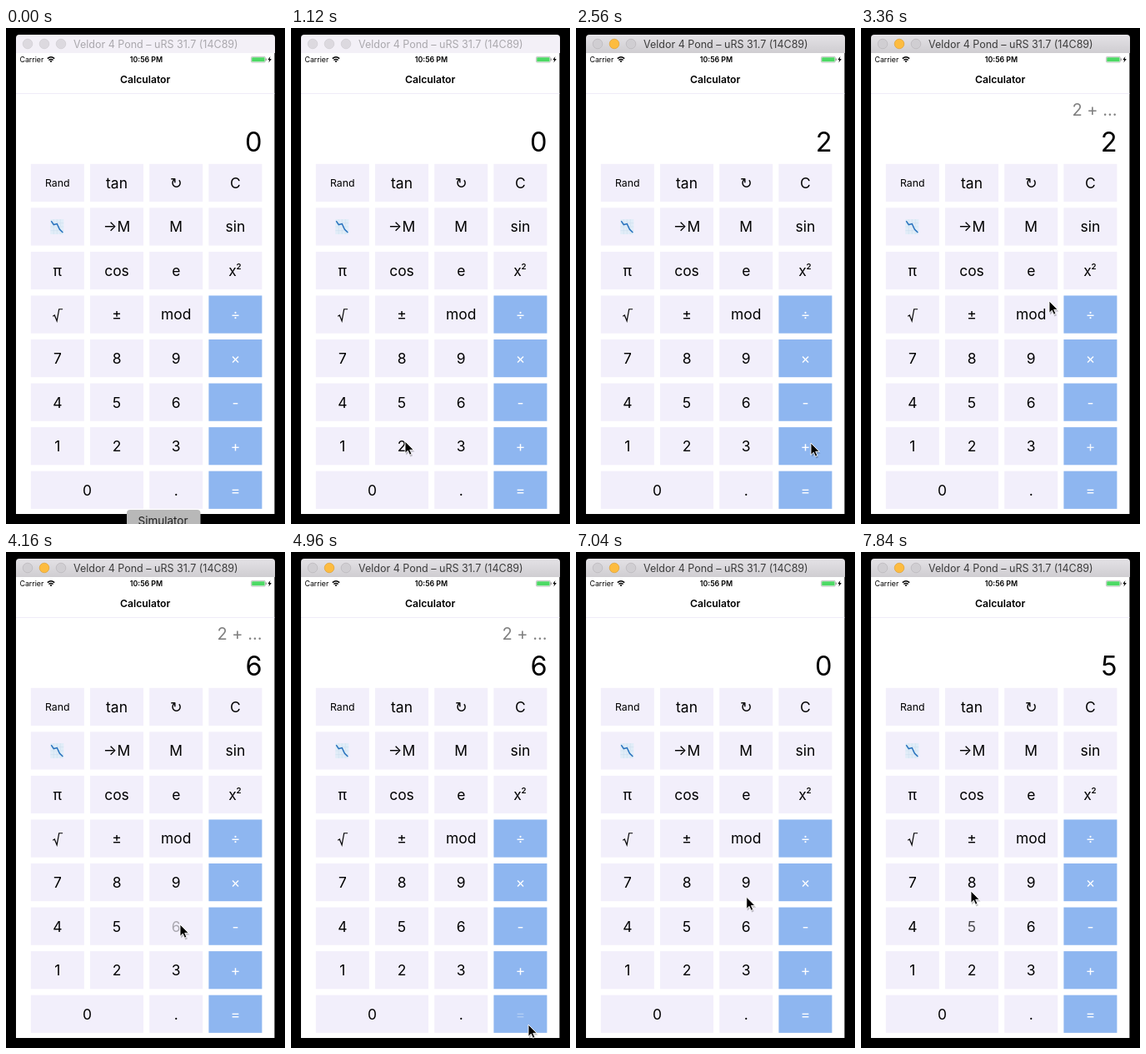
An HTML page that plays this animation: 335 by 594 pixels, repeating every 8000 ms.

```html
<!DOCTYPE html>
<html lang="en">
<head>
<meta charset="utf-8">
<title>Calculator</title>
<style>
  html, body { margin: 0; width: 100%; height: 100%; overflow: hidden; background: #000; }
  svg { display: block; width: 100%; height: 100%; }
  text { font-family: Inter, "DejaVu Sans", sans-serif; white-space: pre; }
  .symbol { font-family: "DejaVu Sans", sans-serif; }
</style>
</head>
<body>
<svg viewBox="0 0 335 594">
  <defs>
    <linearGradient id="bar" x2="0" y2="1">
      <stop offset="0" stop-color="#e4e2e6"/>
      <stop offset="1" stop-color="#cfcdd1"/>
    </linearGradient>
  </defs>
  <rect width="335" height="594"/>
  <path id="titlebar" d="M12 30V12q0-4 4-4H319q4 0 4 4V30Z"/>
  <g id="lights" stroke-width=".7"></g>
  <text id="title" x="81" y="24" font-size="12.5">Veldor 4 Pond – uRS 31.7 (14C89)</text>

  <rect x="12" y="30" width="310.4" height="552" fill="#fff"/>
  <rect x="12" y="78" width="310.4" height="1" fill="#efecf8"/>
  <text x="16.5" y="41" font-size="8.8">Carrier</text>
  <g fill="none" stroke="#000" stroke-width="1.4">
    <path d="M49.8 36.6q4.2-3.7 8.4 0M51.4 38.6q2.6-2.3 5.2 0"/>
    <circle cx="54" cy="40" r=".4"/>
  </g>
  <text x="168.5" y="41" font-size="8.8" font-weight="600" text-anchor="middle">10:56 PM</text>
  <rect x="294.4" y="34.4" width="17" height="6.7" rx="1.3" fill="#fff" stroke="#888" stroke-width=".5"/>
  <rect x="295.2" y="35.2" width="15.4" height="5.1" rx=".6" fill="#4cd964"/>
  <path d="M312.3 36.5v2.6" stroke="#888"/>
  <path d="M317.4 34l-3.2 4.2h2l-.8 3.3 3.4-4.5h-2.1Z"/>
  <text x="167.2" y="66" font-size="12.2" font-weight="600" text-anchor="middle">Calculator</text>

  <text id="history" x="307.5" y="104.5" font-size="20" fill="#808080" text-anchor="end"></text>
  <text id="result" x="307.6" y="148" font-size="32.5" text-anchor="end"></text>
  <g id="keys"></g>

  <g id="tooltip">
    <rect x="145" y="577" width="88.5" height="24" rx="4" fill="#b8b8b8"/>
    <text x="188.5" y="595" font-size="13.5" fill="#222" text-anchor="middle">Simulator</text>
  </g>
  <g id="cursor">
    <path d="M1 2V16.5L4.3 13.5 6.4 18.4 9 17.2 6.9 12.5H11.5Z" opacity=".22"/>
    <path d="M0 0V14.3L3.3 11.2 5.5 16.2 7.9 15.1 5.7 10.3H10.2Z" stroke="#fff" stroke-width=".9"/>
  </g>
</svg>
<script>
const LOOP = 8000, STEP = 160, ENTER = 320, FOCUS = 1920;
const $ = id => document.getElementById(id);

function add(parent, tag, attrs, content = '') {
  const el = document.createElementNS('http://www.w3.org/2000/svg', tag);
  for (const name in attrs) el.setAttribute(name, attrs[name]);
  el.textContent = content;
  parent.append(el);
  return el;
}

const rows = [
  'Rand tan ↻ C', 'chart →M M sin', 'π cos e x²', '√ ± mod ÷',
  '7 8 9 ×', '4 5 6 -', '1 2 3 +', '0 _ . ='
].map(row => row.split(' '));
const keys = {};

function drawChart(g) {
  add(g, 'rect', { x: -8.5, y: -9, width: 16, height: 18, fill: '#e1edf8' });
  add(g, 'path', { d: 'M-4.5-9V9M-.5-9V9M3.5-9V9M-8.5-4.5H7.5M-8.5 0H7.5M-8.5 4.5H7.5', stroke: '#c9dcec', 'stroke-width': .5 });
  add(g, 'path', { d: 'M-7.5-7L-4.5-2.5-.5-3.5 2.5 3 6.5 7', fill: 'none', stroke: '#2470bd', 'stroke-width': 1.5 });
}

function drawKey(name, col, row) {
  const w = name === '0' ? 135.2 : 64;
  const x = 29.8 + col * 71.2, y = 162.8 + row * 52.55;
  const blue = col === 3 && row > 2;
  add($('keys'), 'rect', { x, y, width: w, height: 45.2, fill: blue ? '#8eb6f0' : '#f2effb' });

  const g = keys[name] = add($('keys'), 'g', {
    transform: `translate(${x + w / 2} ${y + 22.7})`,
    'text-anchor': 'middle', fill: blue ? '#fff' : '#000'
  });
  const label = (text, attrs) => add(g, 'text', { y: 6.3, 'font-size': 17.4, ...attrs }, text);
  if (name === 'chart') drawChart(g);
  else if (name === '√') add(g, 'path', { d: 'M-5.5 2l2-1.2 2.8 7L1.9-6.4h4.4', fill: 'none', stroke: '#000', 'stroke-width': 1.2 });
  else if (name === 'x²') {
    label('x', { x: -3.3 });
    label('2', { x: 4.2, y: -2, 'font-size': 9.6, 'font-weight': 600 });
  }
  else if (name === 'Rand') label(name, { y: 4.4, 'font-size': 12.3 });
  else label(name, { class: name === '↻' ? 'symbol' : '' });
}
rows.forEach((row, r) => row.forEach((name, c) => name !== '_' && drawKey(name, c, r)));
const lights = [26, 46, 66].map(cx => add($('lights'), 'circle', { cx, cy: 19, r: 5.8 }));

// Pointer strokes; the pointer rests between them.
const moves = [
  { from: 320, to: 800, x: 133, y: 420 },
  { from: 800, to: 1120, x: 137, y: 495 },
  { from: 2080, to: 2560, x: 282, y: 497 },
  { from: 2880, to: 3360, x: 226, y: 327 },
  { from: 3360, to: 3840, x: 209, y: 446 },
  { from: 4320, to: 4800, x: 285, y: 566 },
  { from: 5120, to: 5760, x: 280, y: 199 },
  { from: 6400, to: 7200, x: 196, y: 438 },
  { from: 7200, to: 7520, x: 137, y: 448 },
  { from: 7520, to: 7840, x: 132, y: 406 }
];

// Each tap dims its key at `down` and takes effect at `up`.
const tap = (key, down, result, history = '', up = down) => ({ key, down, up, result, history });
const taps = [
  tap('2', 1920, '2'),
  tap('+', 2880, '2', '2 + …'),
  tap('6', 4160, '6', '2 + …'),
  tap('=', 4960, '8', '2 + 6 =', 5120),
  tap('C', 6240, '0'),
  tap('5', 7520, '5')
];

const clamp = v => Math.min(1, Math.max(0, v));
const ease = k => k * k * (3 - 2 * k);

function pointer(t) {
  let x = 196, y = 578;
  for (const m of moves) {
    const k = ease(clamp((t - m.from) / (m.to - m.from)));
    x += (m.x - x) * k;
    y += (m.y - y) * k;
  }
  return `translate(${x} ${y})`;
}

function render(t) {
  const active = t >= FOCUS, entered = t >= ENTER;
  $('titlebar').setAttribute('fill', active ? 'url(#bar)' : '#f3f0f7');
  $('title').setAttribute('fill', active ? '#3c3c3c' : '#aaa8ad');
  lights.forEach((light, i) => {
    const [fill, stroke] = !active ? ['#dcd9df', '#cfccd2']
      : i === 1 ? ['#fdbc40', '#e0a030'] : ['#d0ced2', '#b9b7bb'];
    light.setAttribute('fill', fill);
    light.setAttribute('stroke', stroke);
  });

  const last = taps.filter(p => p.up <= t).pop() || { result: '0', history: '' };
  $('result').textContent = last.result;
  $('history').textContent = last.history;
  for (const { key, down, up } of taps) {
    keys[key].setAttribute('opacity', t < down ? 1 : clamp(.3 + Math.max(0, t - up) / 800));
  }

  $('tooltip').style.display = entered ? 'none' : '';
  $('cursor').style.display = entered ? '' : 'none';
  $('cursor').setAttribute('transform', pointer(t));
}

const start = performance.now();
function tick() {
  const t = (performance.now() - start) % LOOP;
  render(Math.floor(t / STEP) * STEP);
  requestAnimationFrame(tick);
}
tick();
</script>
</body>
</html>
```
